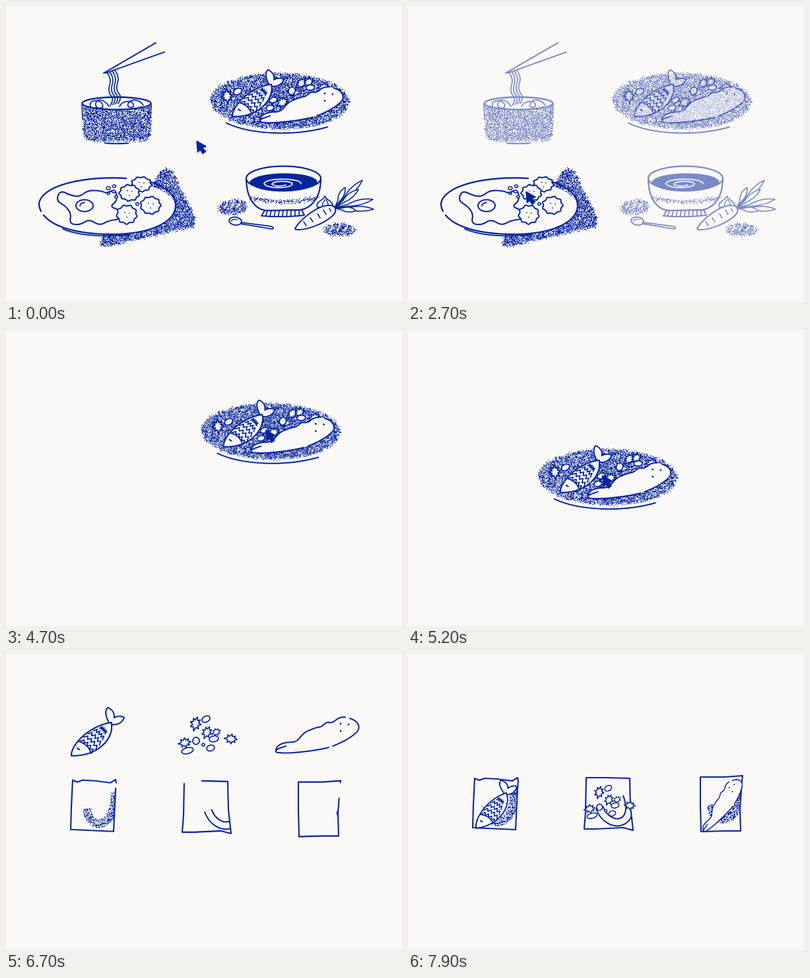
Recreate the animation shown at these times as an HTML page with a canvas. Size 600x450 px, loop 8 s.

```html
<!DOCTYPE html>
<html lang="en">
<head>
<meta charset="utf-8">
<title>Food sketches</title>
<style>
html, body { margin: 0; width: 100%; height: 100%; overflow: hidden; background: #fbf9f8; }
canvas { display: block; }
</style>
</head>
<body>
<canvas id="stage" width="600" height="450"></canvas>
<script>
const INK = '#05259c', PAPER = '#fbf9f8', LOOP = 8000, DIM = 0.48;
const ctx = document.getElementById('stage').getContext('2d');
let g = ctx;

let seed = 7;
const rnd = () => (seed = (seed * 16807) % 2147483647) / 2147483647;

// ---- drawing helpers, all on the current context g ----
function line(d, w = 2, color = INK) {
  g.strokeStyle = color;
  g.lineWidth = w;
  g.lineCap = g.lineJoin = 'round';
  g.stroke(new Path2D(d));
}
function fill(d, color = PAPER) {
  g.fillStyle = color;
  g.fill(new Path2D(d));
}
function shape(d, w) { fill(d); line(d, w); }

function ellipse(x, y, rx, ry, rot = 0) {
  const a = rot * Math.PI / 180, c = rx * Math.cos(a), s = rx * Math.sin(a);
  return `M${x - c} ${y - s}A${rx} ${ry} ${rot} 1 1 ${x + c} ${y + s}A${rx} ${ry} ${rot} 1 1 ${x - c} ${y - s}Z`;
}
function dots(list, r = 1.1) {
  for (const [x, y] of list) fill(ellipse(x, y, r, r), INK);
}
// closed smooth curve around a list of corner points
function blob(pts) {
  const mid = (a, b) => `${(a[0] + b[0]) / 2} ${(a[1] + b[1]) / 2}`;
  const n = pts.length;
  return `M${mid(pts[n - 1], pts[0])}` +
    pts.map((p, i) => `Q${p} ${mid(p, pts[(i + 1) % n])}`).join('') + 'Z';
}
function bumpy(x, y, rx, ry, turn) {
  const pts = Array.from({ length: 18 }, (_, i) => {
    const a = i * Math.PI / 9 + turn, k = i % 2 ? 0.87 : 1.14;
    return [x + rx * k * Math.cos(a), y + ry * k * Math.sin(a)];
  });
  return blob(pts);
}
function stipple(d, [x0, y0, x1, y1], density) {
  const path = new Path2D(d);
  g.fillStyle = INK;
  for (let y = y0; y < y1; y++) for (let x = x0; x < x1; x++) {
    const jx = x + (rnd() - 0.5) * 4, jy = y + (rnd() - 0.5) * 4;
    if (rnd() < density && g.isPointInPath(path, jx * 2, jy * 2)) g.fillRect(x, y, 1.1, 1.1);
  }
}
function at(x, y, rot, scale, draw) {
  g.save();
  g.translate(x, y);
  g.rotate(rot * Math.PI / 180);
  g.scale(scale, scale);
  draw();
  g.restore();
}
const LEAF = 'M0 10L-2 4L-6 5L-4 1L-8-2L-4-3L-5-8L-2-6L0-11L2-6L5-8L4-3L8-2L4 1L6 5L2 4Z';
const leaf = (x, y, rot, s = 1) => at(x, y, rot, s, () => shape(LEAF, 1.7));
const seedOval = (x, y, rx, ry, rot) => shape(ellipse(x, y, rx, ry, rot), 1.7);

function layer(draw) {
  const c = document.createElement('canvas');
  c.width = 1200;
  c.height = 900;
  g = c.getContext('2d');
  g.scale(2, 2);
  draw();
  g = ctx;
  return c;
}

// ---- the pictures ----
const noodles = layer(() => {
  stipple('M116 150Q167 164 219 150L219 190Q218 205 203 205L131 205Q116 204 116 190Z', [113, 146, 223, 210], 0.52);
  line(ellipse(167.5, 148, 52, 9.5), 2.4);
  line('M115 149L116 172M220 149L219 170', 1.6);
  line('M128 152C124 143 142 141 146 149S134 158 136 148S152 144 156 153', 1.7);
  line('M172 153C176 143 192 143 193 150S180 155 186 147S204 144 208 151', 1.7);
  for (let i = 0; i < 4; i++) line(`M${153 + i * 4} ${101 - i}q7 9 4 19t2 16t-1 15`, 1.7);
  line('M227 56L148 102M240 70L151 102', 1.9);
  line('M150 208.5Q168 210 185 208.5', 2);
});

const eggPlate = layer(() => {
  stipple('M241 246L251 250L287 322L284 335L150 366L141 362L148 345L220 275L232 252Z', [139, 243, 290, 369], 0.58);
  fill(ellipse(153.5, 304.5, 104, 42, 1.5));
  line('M182 262C120 258 55 272 50 300Q50 306 53 312M57 318C75 340 120 347 160 347C215 347 258 330 257 302C256 284 236 272 214 266', 2.3);
  line('M86 339C112 350 150 351 188 348', 2);
  line(blob([[76, 296], [82, 280], [98, 288], [112, 290], [124, 280], [145, 281], [152, 285], [166, 278], [169, 296], [157, 305],
    [172, 310], [174, 324], [156, 326], [142, 334], [126, 324], [112, 333], [96, 331], [99, 316], [90, 304]]), 2.1);
  line(ellipse(119, 303.5, 13, 9), 2);
  line('M112 304Q113 299 119 299', 1.7);
  for (const [x, y, r] of [[155, 277, 3], [164, 274, 2.6], [163, 282, 2.6], [155, 285, 2], [167, 290, 2.4], [199, 301, 2.4]])
    shape(ellipse(x, y, r, r * 0.8), 1.6);
  for (const [x, y, rx, ry, a] of [[205, 271, 15, 11, 0.1], [187, 284, 15, 12, 0.3], [183, 317, 15, 14, 0.2], [219, 303, 15, 13, 0]]) {
    shape(bumpy(x, y, rx, ry, a), 2);
    dots([[x - 3, y - 3], [x + 4, y - 2], [x, y + 4]], 0.9);
  }
});

const soup = layer(() => {
  shape('M364 262C364 290 376 310 396 311L446 310C466 306 477 288 477 262Z', 2.2);
  shape(ellipse(420.5, 262, 56.5, 18.5), 2.2);
  fill('M369 268C376 250 466 250 472 267C462 287 378 287 369 268Z', INK);
  line('M447 270C446 261 393 261 391 270C394 278 430 278 434 271C434 265 404 265 403 271C408 275 418 274 424 272', 1.7, PAPER);
  stipple('M367 288Q420 303 474 287L472 293Q420 306 369 294Z', [364, 285, 478, 304], 0.42);
  line('M392 311L387 319Q420 322 452 318L448 310', 2);
  for (let x = 396; x < 449; x += 6) line(`M${x} 311L${x - 1 + (x - 420) / 20} 319`, 1.7);

  line(ellipse(347.5, 327, 9.5, 6, 8), 1.8);
  line('M341 327Q344 323 350 325', 1.4);
  line('M356 329L402 335Q408 338 403 339L355 331', 1.8);

  stipple(blob([[320, 305], [332, 296], [352, 292], [366, 300], [363, 313], [342, 317], [324, 315]]), [318, 290, 369, 320], 0.55);
  line('M331 307Q336 302 335 297M341 306Q346 300 345 294M351 305Q356 300 355 295', 2, PAPER);
  stipple(blob([[480, 336], [494, 330], [518, 330], [532, 339], [524, 348], [494, 349], [482, 345]]), [478, 327, 534, 352], 0.55);
  line('M491 341Q496 337 494 332M502 341Q506 336 506 331M513 341Q518 337 517 332', 2, PAPER);

  shape('M472 306C468 297 480 297 483 289C486 296 497 297 495 306Z', 1.7);
  line('M479 304Q480 298 484 294M488 303Q488 298 485 295', 1.3);
  for (const [x, y] of [[540, 265], [534, 279], [556, 294], [557, 309], [530, 311], [514, 276]]) {
    const a = Math.atan2(y - 307, x - 498) * 180 / Math.PI, r = Math.hypot(x - 498, y - 307);
    at(498, 307, a, 1, () => shape(`M0 0L${r * 0.35} -1Q${r * 0.7} -7 ${r} 0Q${r * 0.7} 6 ${r * 0.35} 2Z`, 1.6));
  }
  shape('M438 338C446 325 470 304 489 303C501 303 502 312 495 319C480 332 455 341 441 340Q438 340 438 338Z', 2);
  line('M451 328L455 334M461 322L465 328M472 316L476 322M481 310L485 317M490 308L492 312', 1.6);
});

const plate = layer(() => {
  stipple(ellipse(414.5, 144, 105, 42.5, 1), [305, 98, 525, 191], 0.53);
  line('M334 178C372 196 438 198 487 184', 2);
});

const plateVeg = layer(() => {
  leaf(335, 138, -5, 1.05);
  leaf(447, 118, 35, 0.9);
  leaf(458, 116, 50, 0.85);
  leaf(418, 147, 60, 1);
  leaf(481, 124, 85, 0.95);
  seedOval(351, 130, 6.5, 4.5, -30);
  seedOval(433, 129, 5, 6, 20);
  seedOval(461, 124, 6.5, 4, -5);
  seedOval(400, 155, 6, 4, -15);
  seedOval(405, 143, 6, 4, -20);
});

const fish = layer(() => {
  shape('M399 120C392 108 393 100 397 97C405 101 407 106 406 112C412 109 418 109 421 112C417 121 409 123 402 122Z', 2);
  shape('M343 168C343 150 372 123 402 119C407 143 381 170 343 168Z', 2.1);
  line('M354 147Q368 151 372 164', 1.8);
  line('M352 157L355 159', 2);
  const ax = 0.71, ay = -0.7;
  [12.5, 13, 12, 9.5, 6].forEach((half, row) => {
    const cx = 368 + ax * row * 8, cy = 152 + ay * row * 8, n = 8;
    let d = '';
    for (let i = 0; i <= n; i++) {
      const u = (i / n * 2 - 1) * half, v = (i % 2 ? 2.4 : -2.4) - u * u / 60;
      d += `${i ? 'L' : 'M'}${cx - ay * u + ax * v} ${cy + ax * u + ay * v}`;
    }
    line(d, 1.7);
  });
});

const veg = layer(() => {
  leaf(287, 107, 15, 1.05);
  leaf(304, 120, 25, 0.95);
  leaf(318, 119, 65, 0.7);
  leaf(270, 135, 80, 0.95);
  leaf(340, 129, 95, 0.95);
  seedOval(303, 99, 6.5, 4.5, -30);
  seedOval(288, 132, 5, 5.5, 10);
  seedOval(275, 147, 9, 4.5, -15);
  seedOval(315, 129, 7, 4.5, -10);
  seedOval(299, 138, 2.2, 2, 0);
  seedOval(310, 143, 6, 4.5, -15);
});

const root = layer(() => {
  const top = 'M409 147C409 138 420 134 434 134C445 133 446 122 457 117C465 114 468 112 475 111C482 110 482 103 490 104C498 106 500 95 514 96';
  fill(top + 'C534 99 543 112 529 121C521 128 508 135 494 140C470 147 430 152 414 150Z');
  line(top + 'M521 98C535 102 539 113 529 121C521 128 508 135 495 140M489 142C470 147 430 152 414 150Q408 150 409 147C411 143 420 142 424 140', 2);
  dots([[507, 106], [519, 107], [507, 117]], 1.4);
});

const cursor = layer(() => {
  const d = 'M289 205.5L303 213.5L297.5 215.5L302.5 221L298 224.5L294.5 218.5L290.5 222Z';
  fill(d, INK);
  line(d, 1.6);
});

// ---- bags ----
const grain = (() => {
  const c = document.createElement('canvas');
  c.width = c.height = 128;
  const k = c.getContext('2d');
  k.fillStyle = INK;
  for (let i = 0; i < 128 * 128; i++) if (rnd() < 0.5) k.fillRect(i % 128, i >> 7, 1, 1);
  return ctx.createPattern(c, 'repeat');
})();

function bag(pts, draw, drift, rise, slide, smile, textured) {
  const d = 'M' + pts.map(p => p.join(' ')).join('L') + 'Z';
  const el = document.createElementNS('http://www.w3.org/2000/svg', 'path');
  el.setAttribute('d', d);
  return { path: new Path2D(d), len: el.getTotalLength(), draw, drift, rise, slide, smile: new Path2D(smile), textured };
}
const bags = [
  bag([[167, 193], [166, 205], [163, 267], [140, 266], [98, 264], [99, 230], [101, 189], [108, 192], [116, 189], [135, 190], [158, 193], [166, 188]],
    [5400, 6850], 0.03, 5500, 6108, 'M161 206C164 264 121 268 119 232', true),
  bag([[270, 188], [300, 188], [336, 189], [337, 232], [341, 268], [326, 264], [285, 266], [267, 266], [269, 240]],
    [5780, 6930], 0.1, 5630, 6316, 'M331 213C350 264 302 268 290 233', false),
  bag([[506, 193], [503, 235], [504, 269], [480, 269], [444, 270], [443, 230], [443, 187], [480, 187], [507, 185]],
    [5770, 6900], 0.07, 5760, 6608, 'M501 205C506 258 463 264 459 229', true)
];

// ---- timing ----
const ramp = (t, a, b) => Math.min(1, Math.max(0, (t - a) / (b - a)));
const ease = (t, a, b) => { const p = ramp(t, a, b); return p * p * (3 - 2 * p); };
const left = (t, a, b) => (1 - ramp(t, a, b)) ** 2;
const mix = (a, b, p) => a + (b - a) * p;

function show(img, alpha, x = 0, y = 0) {
  if (alpha <= 0) return;
  ctx.globalAlpha = alpha;
  ctx.drawImage(img, x, y, 600, 450);
  ctx.globalAlpha = 1;
}

function drawBag(b, t) {
  const k = ease(t, ...b.draw);
  if (!k) return;
  ctx.save();
  ctx.translate(0, 45 * left(t, b.rise, b.rise + 1600));
  if (t > b.slide) {
    ctx.save();
    ctx.clip(b.path);
    ctx.translate(60 * left(t, b.slide, b.slide + 800), 0);
    ctx.lineCap = 'butt';
    ctx.lineWidth = 13;
    ctx.strokeStyle = b.textured ? grain : INK;
    ctx.stroke(b.smile);
    if (!b.textured) {
      ctx.lineWidth = 9;
      ctx.strokeStyle = PAPER;
      ctx.stroke(b.smile);
    }
    ctx.restore();
  }
  ctx.strokeStyle = INK;
  ctx.lineWidth = 2.1;
  ctx.lineCap = ctx.lineJoin = 'round';
  if (k < 1) {
    ctx.setLineDash([k * b.len, (1 - k) * b.len]);
    ctx.lineDashOffset = -b.drift * k * b.len;
  }
  ctx.stroke(b.path);
  ctx.restore();
}

// img, pivot, resting place and scale, final place, scale and turn
const foods = [
  [fish, [382, 133], [139, 118.5, 1.03], [133, 227, 0.92, -10]],
  [veg, [305, 123], [305, 123, 1], [305, 225, 0.87, 0]],
  [root, [472, 123], [472, 123, 1], [474, 228, 0.72, -37]]
];

function drawFood([img, [px, py], rest, end], i, t) {
  const t0 = 5620 + i * 130;
  const up = left(t, t0, t0 + 600), drop = ease(t, 6930 + i * 40, 7800 + i * 40);
  const x = mix(rest[0], end[0], drop), y = mix(rest[1], end[1], drop) - 14 * up;
  at(x, y, end[3] * drop, mix(rest[2], end[2], drop) * (1 - 0.14 * up),
    () => show(img, ramp(t, t0, t0 + 350), -px, -py));
}

function render(t) {
  ctx.fillStyle = PAPER;
  ctx.fillRect(0, 0, 600, 450);

  const overEgg = ease(t, 300, 600) - ease(t, 2850, 3050);
  const overFish = ease(t, 3250, 3500);
  const others = 1 - ease(t, 4400, 4650);
  const idle = (1 - DIM * Math.max(overEgg, overFish)) * others;
  show(noodles, idle);
  show(soup, idle);
  show(eggPlate, (1 - DIM * overFish) * others);

  const drag = ease(t, 4550, 5250), dx = -114 * drag, dy = 80 * drag;
  const held = 1 - ease(t, 5250, 5550), dish = (1 - DIM * overEgg) * held;
  show(plate, dish, dx, dy);
  show(plateVeg, dish, dx, dy);
  show(fish, dish, dx, dy);
  show(root, dish, dx - 24, dy + 27);

  const toEgg = ease(t, 50, 800), toFish = ease(t, 2720, 3550);
  show(cursor, held, -110 * toEgg + 228 * toFish + dx, 77 * toEgg - 140 * toFish + dy);

  for (const b of bags) drawBag(b, t);
  foods.forEach((f, i) => drawFood(f, i, t));
}

function tick() {
  render(performance.now() % LOOP);
  requestAnimationFrame(tick);
}
tick();
</script>
</body>
</html>
```
